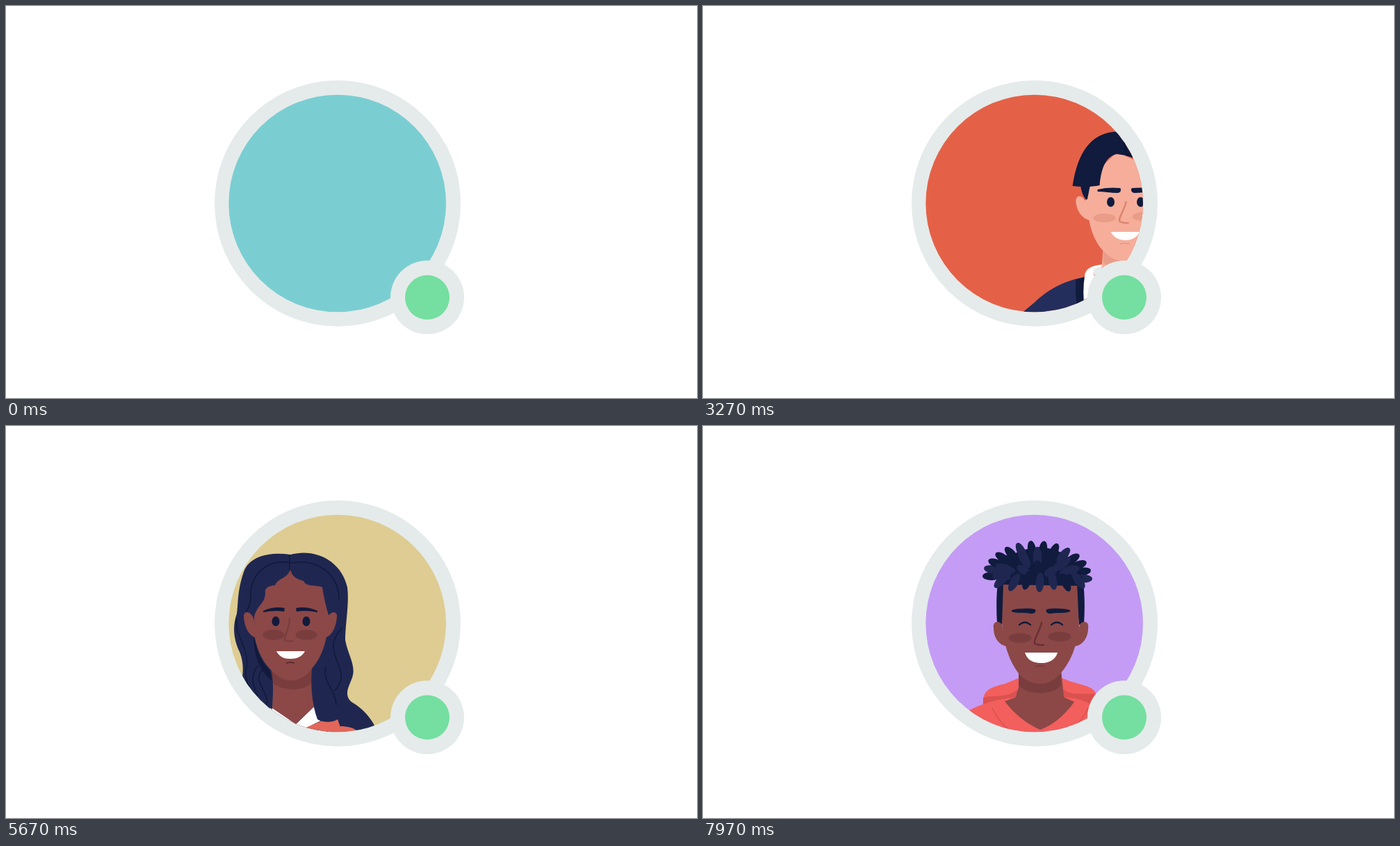
Recreate the animation shown at these times as an HTML page. Size 994 by 564 pixels, loop 8 s.

```html
<!DOCTYPE html>
<html lang="en">
<head>
<meta charset="utf-8">
<title>Avatars</title>
<style>
html, body { margin: 0; width: 100%; height: 100%; overflow: hidden; background: #fff; }
svg { display: block; width: 100%; height: 100%; }
</style>
</head>
<body>
<svg viewBox="0 0 994 564">
  <clipPath id="disc"><circle cx="476.7" cy="284" r="156.3"/></clipPath>
  <circle cx="477" cy="284" r="177" fill="#e5ebea"/>
  <circle id="bg" cx="476.7" cy="284" r="156.3"/>
  <g clip-path="url(#disc)"><g id="people"></g></g>
  <circle cx="606" cy="419.3" r="53" fill="#e5ebea"/>
  <circle cx="606" cy="419.3" r="32" fill="#74dfa0"/>
</svg>
<script>
const NAVY = '#101b3d', INK = '#0a1330', INDIGO = '#1f2751', WHITE = '#fff', GREY = '#e5ebea';
const BROWN = '#8b4847', UMBER = '#7a3d3e', PEARL = '#fce6df';

const fill = (color, d) => `<path fill="${color}" d="${d}"/>`;
const line = (color, width, d) =>
  `<path fill="none" stroke="${color}" stroke-width="${width}" stroke-linecap="round" stroke-linejoin="round" d="${d}"/>`;
const oval = (color, x, y, rx, ry = rx, turn = 0) =>
  `<ellipse fill="${color}" rx="${rx}" ry="${ry}" transform="translate(${x} ${y}) rotate(${turn})"/>`;
// Draws a part and its mirror image about the vertical line x
const pair = (x, part) => part + `<g transform="matrix(-1 0 0 1 ${2 * x} 0)">${part}</g>`;

function redhead() {
  const skin = '#f6bcab', hair = '#e6783a', rust = '#d56428';
  return fill(WHITE, 'M174 450V437C190 407 220 396 243 391H365C400 397 433 410 442 437V450Z') +
    pair(308, fill(WHITE, 'M338 376C350 376 360 382 363 390L340 420 310 430Z') +
      fill(GREY, 'M363 390 375 393 373 404 362 400Z')) +
    fill(skin, 'M279 340H337V380L342 395 308 425 274 395 279 380Z') +
    fill('#eaa898', 'M279 350H337V366Q308 388 279 366Z') +
    pair(308, oval(hair, 350, 197, 22, 21) + line(rust, 2, 'M340 209C346 220 364 218 366 196C367 188 363 182 359 180M340 209C334 196 342 182 352 180')) +
    fill(rust, 'M240 287C236 255 241 228 253 214C270 195 346 195 363 214C376 230 379 260 376 287L350 300H266Z') +
    fill(hair, 'M244 228C262 190 354 190 372 228Q366 231 354 228H262Q250 231 244 228Z') +
    pair(308, fill(skin, 'M362 288C369 279 378 281 377 292C375 306 368 316 359 316Z')) +
    fill(skin, 'M308 226H338C353 225 364 233 365 253L362 292 361 316C354 337 346 347 338 355Q323 369 308 369T278 355C270 347 262 337 255 316L254 292 251 253C252 233 263 225 278 226Z') +
    pair(308, fill(rust, 'M318 262C332 260 347 261 351 265C349 268 337 267 319 269Z') +
      line(NAVY, 2.4, 'M322 284Q330 276 339 284') + oval('#eaa898', 336, 301, 16, 7)) +
    line('#de8e7c', 2.4, 'M307 278C304 292 297 305 299 309Q304 312 311 310') +
    fill(WHITE, 'M285 324H332C328 334 319 339 308 339S288 334 285 324Z');
}

function bunWoman() {
  const skin = '#f6bcab', blush = '#eaa898', green = '#3bb18f', nose = '#de8e7c';
  return fill(INK, 'M441 204C439 182 448 168 465 168C480 168 485 165 500 165C518 167 529 178 528 193L526 206Z') +
    fill(NAVY, 'M411 286C402 258 407 238 418 222C433 200 455 191 484 192C528 192 555 225 554 262C554 276 551 284 546 291L430 302Z') +
    line(INK, 1.6, 'M415 268C422 235 446 228 468 222Q475 217 479 210M421 264C425 228 450 212 470 210M497 211C520 222 534 240 536 264M510 211C535 220 546 240 546 262') +
    fill(green, 'M370 450V428C394 412 410 406 425 403H535C548 406 570 412 585 450Z') +
    fill(skin, 'M447 362V395Q447 402 443 408L474 441H482L515 408Q510 402 510 395V358Z') +
    fill(blush, 'M447 362V379C460 397 498 397 510 377V358Z') +
    fill(WHITE, 'M414 411C425 402 432 399 445 400C442 406 443 410 446 413L474 441H425L437 428Z') +
    fill(WHITE, 'M513 400C526 399 537 402 545 411L519 421 531 431 525 441H480L511 413C515 410 515 405 513 400Z') +
    pair(478.5, fill(skin, 'M411 286C414 279 424 282 426 300L429 317C418 314 411 300 411 286Z')) +
    fill(skin, 'M487 231C470 238 452 240 447 255C440 274 431 282 427 303C429 330 435 347 447 363Q464 380 478 380C493 380 505 371 513 360C523 346 527 330 527 300L522 266C512 250 498 236 487 231Z') +
    fill(NAVY, 'M518 258 533 284C524 305 530 323 532 338C533 348 529 355 525 361C529 341 519 329 519 300Z') +
    pair(478.5, oval(PEARL, 423, 316, 6) +
      fill(NAVY, 'M438 284C446 278 459 277 468 278Q471 281 468 283C458 282 448 283 438 285Z')) +
    pair(478, oval(NAVY, 456, 297, 5.8, 7.5)) + pair(476.5, oval(blush, 453, 317, 15.5, 7.5)) +
    line(nose, 2.5, 'M476 293C474 305 467 321 469 325H480') +
    line(nose, 2.3, 'M457 341Q478 345 497 340') + line(blush, 2, 'M472 350Q477 348 482 350');
}

function partedMan() {
  const skin = '#f6ae9b', shade = '#e99d89', blue = '#242e5c';
  return pair(416, fill(blue, 'M474 390C505 395 530 410 546 426L575 450H468Z') +
      fill(NAVY, 'M475 390 487 394C488 410 487 425 484 445H470Z')) +
    fill(WHITE, 'M358 385C361 376 371 373 383 372H449C462 373 475 381 476 392Q479 415 473 445H359Q353 415 358 385Z') +
    pair(416, fill(GREY, 'M449 374 461 378 463 387 450 387Z')) +
    fill(skin, 'M384 348 382 376 380 386H370C378 408 393 425 405 436H437C450 420 459 405 462 387L451 386 448 348Z') +
    fill(shade, 'M384 350V369C397 384 435 384 448 369V348Z') +
    pair(417.5, fill(NAVY, 'M351 252H370L361 280Q352 272 351 252Z')) +
    pair(417, fill(skin, 'M345 282C344 272 353 271 358 280L364 276 368 309C353 307 346 294 345 282Z')) +
    fill(skin, 'M368 245 361 280 364 309C368 329 375 342 383 351Q397 367 414 367C430 367 441 361 450 350C462 336 470 323 473 300L469 240 404 210Z') +
    fill(NAVY, 'M340 259C347 213 365 184 400 181L414 182C440 179 465 186 478 205C488 220 493 240 497 257C485 260 475 261 470 263C461 262 457 255 455 243L451 264C446 244 438 222 426 218Q415 214 404 213C386 216 381 238 379 258C365 261 350 260 340 259Z') +
    fill(INK, 'M418 215C422 210 430 211 436 216C448 224 453 235 455 245L451 264C446 244 438 222 426 218Z') +
    line(INK, 1.5, 'M414 183Q414 200 418 215') +
    pair(417, fill(NAVY, 'M376 264C388 261 400 261 409 262Q411 268 405 269C395 269 385 267 376 267Z')) +
    pair(416.5, oval(NAVY, 395, 282, 5.5, 7)) +
    oval(shade, 386, 305, 16, 6.5) + oval(shade, 442, 302.5, 16, 6.5, -3) +
    line('#dc8470', 2.5, 'M417 282C415 293 405 306 408 310Q413 313 420 312') +
    fill(WHITE, 'M395 325H437C433 333 425 337 416 337S399 333 395 325Z') + line(shade, 2, 'M409 342Q415 341 421 342');
}

function wavyWoman() {
  return fill(INDIGO, 'M409 185C380 181 350 187 342 210C333 235 334 255 332 270C325 290 328 308 336 325C342 340 341 352 340 362C337 378 330 388 318 397Q301 410 295 450H460L481 434C500 440 515 438 535 441C526 420 514 407 497 397C486 387 492 378 498 362C504 345 492 330 488 308C488 285 494 255 491 232C483 195 446 175 409 185Z') +
    fill('#e2675a', 'M350 450 380 422 440 430 455 424 478 422 481 432C492 432 500 434 505 439V450Z') +
    fill(WHITE, 'M372 410 383 405 417 429 447 400 453 424 425 437 410 450Z') +
    fill(BROWN, 'M380 340V404L417 429 446 401 441 340Z') +
    fill(UMBER, 'M380 350V367C395 382 430 384 441 367V346Z') +
    fill(INDIGO, 'M441 340C437 370 440 400 448 422C456 427 470 427 477 422L481 433 492 400 485 300 463 300Z') +
    fill(INDIGO, 'M380 345C387 370 383 395 383 408L342 370 350 300H360Z') +
    fill('#121a3c', 'M356 300C362 330 370 342 380 352L382 366C362 350 356 325 356 300Z') +
    pair(409, fill(BROWN, 'M342 272C344 265 354 267 357 280L360 305C348 302 342 286 342 272Z')) +
    fill(BROWN, 'M409 206C405 220 392 218 387 229Q371 231 373 240C373 255 361 258 357 274L358 305C362 325 370 340 382 352Q396 366 409 366C422 366 432 360 440 349C452 335 462 315 465 275C460 260 457 245 455 232C445 228 432 232 428 223Q411 219 409 206Z') +
    line('#121a3c', 1.7, 'M408 186V207M409 197C375 190 351 215 352 245Q352 258 346 266M411 197C450 190 479 215 479 250M332 278C328 300 350 320 346 345Q343 360 350 377M484 290C454 320 485 340 482 365Q479 375 473 380M374 348C348 360 380 385 375 400M362 345C350 362 356 375 362 388M460 347C455 370 474 378 475 401') +
    pair(409, fill('#121a3c', 'M370 266C380 261 392 260 401 262L400 267C390 265 380 266 370 268Z')) +
    pair(410, oval('#121a3c', 388, 281, 5.5, 7)) + pair(408.5, oval(UMBER, 385, 300.5, 15.5, 7.5)) +
    line(UMBER, 2.4, 'M408 277C408 290 400 303 401 308Q407 311 412 309') +
    fill(WHITE, 'M389 324H430C426 332 418 335 409 335S393 332 389 324Z') + line('#5f2d31', 2, 'M404 341Q409 339 414 341');
}

function bobWoman() {
  const skin = '#de9480', shade = '#cf8374', nose = '#c46c57';
  return fill(BROWN, 'M477 195C450 187 425 200 414 224C404 245 407 265 405 280C402 300 390 330 388 345C386 358 398 365 410 363Q418 374 430 371Q438 378 450 378H510Q520 376 525 372C533 376 541 373 544 365C560 366 572 358 570 344C568 330 555 315 553 290C551 270 553 250 545 230C535 197 512 191 477 195Z') +
    fill(WHITE, 'M365 450V425C395 404 418 393 432 388H530C548 394 575 408 590 450Z') +
    pair(478, fill('#edf0ef', 'M412 401 426 393Q435 388 447 389L443 403 478 434V441H458L425 424 433 416Z')) +
    fill(skin, 'M447 350V385Q443 394 443 403L478 434 513 403Q513 394 509 385V350Z') +
    fill(shade, 'M447 352V371C459 386 496 386 510 373V350Z') +
    pair(478, fill(skin, 'M411 278C412 269 423 269 426 288L430 307C418 305 411 293 411 278Z')) +
    fill(skin, 'M476 225C466 243 444 240 434 252C427 265 429 278 426 290L429 312C433 330 437 345 447 355Q460 368 478 368C490 368 501 363 509 353C520 339 526 325 530 300L533 278C524 250 502 231 476 225Z') +
    pair(476, oval(PEARL, 421.3, 307, 6)) +
    pair(478, fill(BROWN, 'M436 270C443 264 454 263 468 263Q470 266 468 269C456 268 446 269 436 270Z') +
      line(NAVY, 2.4, 'M450 288Q458 280 466 288')) +
    pair(476.5, oval(shade, 451, 304, 16, 8)) +
    line(nose, 2.5, 'M476 280C475 293 467 308 469 312Q474 314 480 313') +
    line(nose, 2.5, 'M456 329Q478 335 501 328') + line(shade, 2, 'M472 339Q477 340 483 339');
}

function curlyMan() {
  const coral = '#f25f5c', deep = '#da5150';
  let locks = '';
  const fan = (count, rx, ry, long, wide, tint) => {
    for (let i = 0; i < count; i++) {
      const a = Math.PI * (1 + i / (count - 1)), x = rx * Math.cos(a), y = ry * Math.sin(a);
      locks += oval(tint(i), 481 + x, 218 + y + i / count * 4 - 2, long, wide, Math.atan2(y * 1.3, x) * 180 / Math.PI);
    }
  };
  fan(14, 66, 40, 13, 6, i => i % 4 == 1 ? INDIGO : NAVY);
  fan(9, 50, 29, 15, 6.5, i => i % 3 == 2 ? NAVY : INDIGO);
  fan(5, 28, 13, 11, 6, i => i % 2 ? INDIGO : NAVY);
  for (let i = 0; i < 7; i++)
    locks += oval(i % 3 == 2 ? NAVY : INDIGO, 429 + i * 18.5, 222 + i % 2 * 3, 6, 14, 42 - i * 13);
  return fill(coral, 'M403 402C401 381 412 376 434 371L456 362H515C540 374 560 371 566 386V402Z') +
    fill(deep, 'M403 391C420 386 440 393 456 376H515C530 391 548 383 566 386V402H403Z') +
    fill(coral, 'M365 450V420C390 402 418 393 452 390H520C550 392 580 405 600 450Z') +
    fill(BROWN, 'M454 350V375L450 390Q440 394 434 396C448 415 468 430 485 437C505 430 522 414 534 397L519 390 515 350Z') +
    fill(UMBER, 'M454 355V373C466 388 504 388 515 373V353Z') +
    pair(485, line(deep, 1.5, 'M416 406C422 418 431 430 440 437')) +
    pair(485.5, fill(NAVY, 'M424 226H436L430 286 423 284Q421 250 424 226Z')) +
    pair(486, fill(BROWN, 'M418 291C416 281 426 279 430 286L437 317C424 315 418 302 418 291Z')) +
    fill(BROWN, 'M432 226H538L541 290C537 320 528 340 515 355Q502 371 485 371C474 371 462 366 454 356C445 344 437 327 434 310L430 284Z') +
    fill(NAVY, 'M422 228C420 200 440 178 485 174C525 178 545 200 546 230Q485 229 422 228Z') + locks +
    pair(486, fill(NAVY, 'M444 265C455 262 470 262 478 264Q480 269 473 270C462 268 452 270 444 267Z') +
      line(NAVY, 2.2, 'M455 286Q463 279 471 286')) +
    oval(UMBER, 456, 305, 16.5, 7) + oval(UMBER, 513, 303, 16.5, 7) +
    line('#682f33', 2.4, 'M487 283C484 296 475 308 477 313Q482 316 490 315') +
    fill(WHITE, 'M463 326H510C507 336 498 341 486 341S466 336 463 326Z') + line(UMBER, 2, 'M479 346Q485 344 491 346');
}

// Each avatar: drawing, shift to its resting place, backdrop
const cast = [
  [redhead, 175, [122, 206, 210]],
  [bunWoman, 3.4, [235, 169, 82]],
  [partedMan, 70, [228, 97, 72]],
  [wavyWoman, 70, [255, 212, 96]],
  [bobWoman, 0, [155, 189, 245]],
  [curlyMan, -3.4, [196, 156, 245]]
];
const LOOP = 8000, TURN = 1500, SLIDE = 500, TRAVEL = 270, FPS = 30;
const bg = document.getElementById('bg'), people = document.getElementById('people');
people.innerHTML = cast.map(([draw]) => `<g>${draw()}</g>`).join('');

const clamp = x => Math.min(1, Math.max(0, x));
const ease = x => x * x * (3 - 2 * x);

function render(ms) {
  const t = Math.floor((ms % LOOP + 4) * FPS / 1000) * 1000 / FPS;
  const now = Math.min(cast.length - 1, Math.floor((t + .01) / TURN)), u = t - now * TURN;
  const enter = clamp(u / SLIDE), leave = clamp((u - 2 * SLIDE) / SLIDE);
  const [, rest, from] = cast[now], to = (cast[now + 1] || cast[now])[2];
  const x = rest + TRAVEL * (1 - ease(enter) - ease(leave));
  bg.setAttribute('fill', `rgb(${from.map((c, i) => Math.round(c + (to[i] - c) * leave))})`);
  [...people.children].forEach((g, i) => {
    g.setAttribute('display', i == now ? 'inline' : 'none');
    g.setAttribute('transform', `translate(${x} 0)`);
  });
}

const start = performance.now();
function tick() {
  render(performance.now() - start);
  requestAnimationFrame(tick);
}
tick();
</script>
</body>
</html>
```
